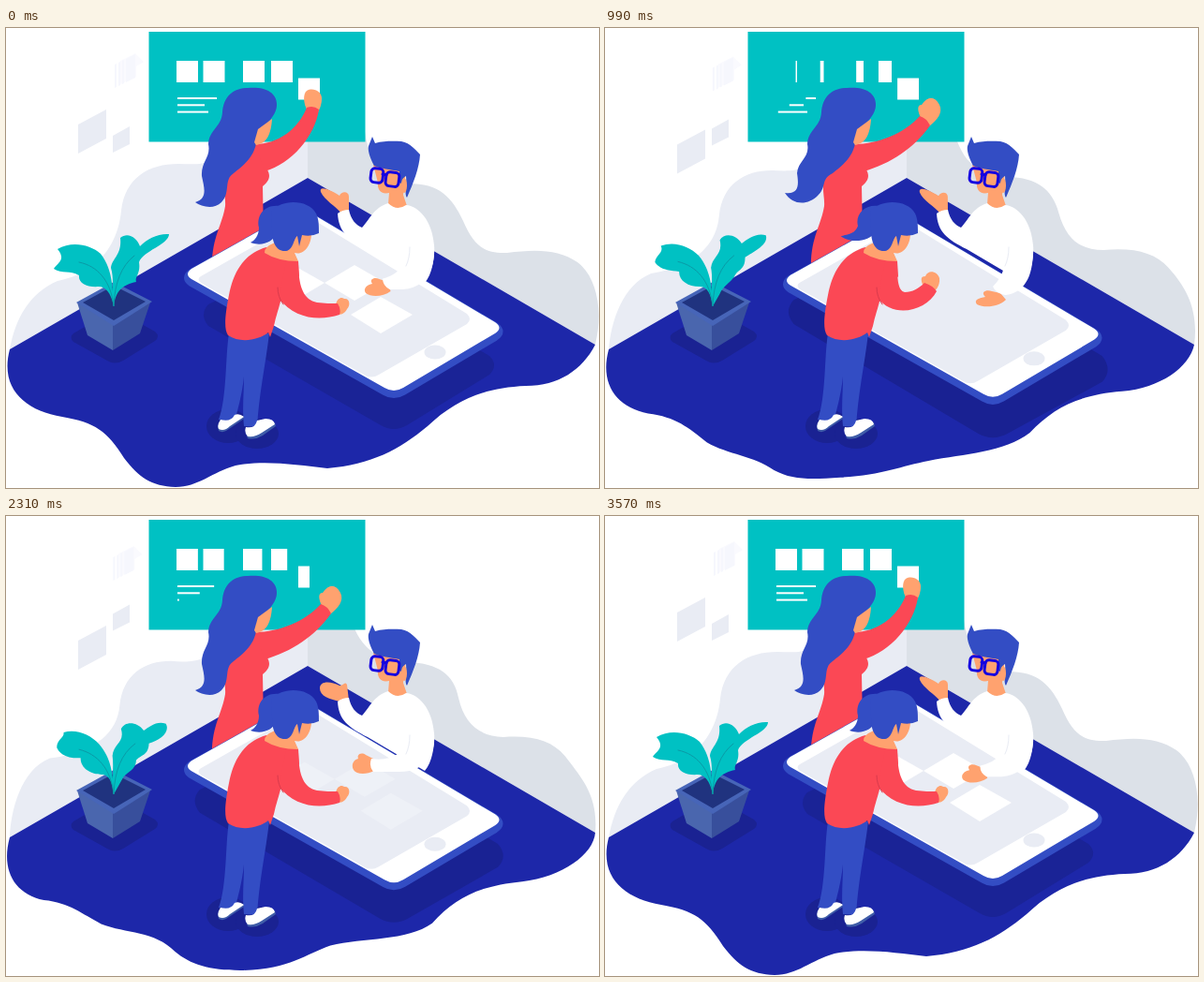
Write an HTML page that moves like this. It is 633 px wide and 491 px high and loops after 3600 ms.

```html
<!DOCTYPE html>
<html lang="en">
<head>
<meta charset="utf-8">
<title>Team at work</title>
<style>
  html, body { margin: 0; width: 100%; height: 100%; overflow: hidden; background: #fff; }
  svg { display: block; width: 633px; height: 491px; }
  .floor { fill: #1d27a9; }
  .shade { fill: #1a2292; }
  .wall { fill: #e9ecf4; }
  .wall2 { fill: #dce1e8; }
  .teal { fill: #00c1c3; }
  .blue { fill: #334dc4; }
  .red { fill: #fb4855; }
  .skin { fill: #ffa26f; }
  .white { fill: #fff; }
  .line { fill: none; stroke-linecap: round; }
</style>
</head>
<body>
<!-- data-to is the second pose of a path, data-by the channel that blends it -->
<svg viewBox="0 0 633 491">
  <path class="wall" data-by="sway"
    d="M4 343C10 310 25 283 55 270C95 262 119 235 123 195C127 160 152 145 184 145C205 145 220 150 240 120L322 100L322 160Z"
    data-to="M4 343C4 315 14 268 45 256C85 251 118 238 121 204C124 172 146 157 174 157C196 159 215 158 232 134L322 100L322 160Z"/>
  <path class="wall2" data-by="sway"
    d="M322 100L382 100C384 130 395 165 430 166C462 166 476 180 488 206C500 234 512 241 535 240C565 236 590 236 610 250C630 265 638 300 629 338L322 160Z"
    data-to="M322 100L362 100C370 130 385 153 430 154C460 155 479 166 482 192C487 220 505 234 530 235C565 233 585 242 597 262C612 284 631 300 629 338L322 160Z"/>
  <path class="floor" data-by="sway"
    d="M322 160L629 338C615 365 590 382 555 382C510 384 480 397 450 425C420 450 390 466 343 470C310 466 275 461 245 467C220 474 205 490 181 490C155 489 142 480 126 459C108 430 95 421 60 415C20 408 -7 385 4 343Z"
    data-to="M322 160L629 338C630 360 595 386 550 392C505 397 480 409 456 437C430 455 380 446 347 456C322 468 310 489 256 489C218 488 196 477 180 459C160 432 125 438 96 430C75 424 62 411 36 409C5 402 -5 375 4 343Z"/>

  <path id="panelA" class="wall" d="M77 103L107 87V118L77 134Z"/>
  <path id="panelB" class="wall" d="M114 115L132 105V124L114 133Z"/>
  <g id="panelC" fill="#f6f7fd">
    <path d="M122 35L138 27L147 36L139 41V52L122 60Z" opacity=".6"/>
    <path d="M116 39l2-1v25l-2 1zM120 37l2-1v25l-2 1zM124 35l2-1v25l-2 1zM128 33l10-5v25l-10 5z"/>
  </g>

  <path class="teal" d="M152.500 4H383.500V121.500H152.500Z"/>
  <g id="notes" class="white"></g>

  <path class="shade" d="M72 326L108 305Q116 300 125 305L159 324Q165 329 159 334L125 355Q116 360 108 355L72 335Q67 330 72 326Z"/>
  <path id="shadow" class="shade" data-by="pulse"
    d="M216 295L330 240L516 350Q526 360 516 370L428 424Q414 432 400 424L216 318Q206 306 216 295Z"
    data-to="M201 290L330 230L531 350Q543 365 531 378L430 433Q414 442 398 433L201 316Q190 302 201 290Z"/>
  <ellipse class="shade" cx="237" cy="425" rx="23" ry="18"/>
  <ellipse class="shade" cx="268" cy="433" rx="23" ry="16"/>

  <!-- plant -->
  <path fill="#4a66ae" d="M76 293L114 310V344L87 328Z"/>
  <path fill="#384f9c" d="M154 293L114 310V344L143 326Z"/>
  <path fill="#4765b8" d="M75 293L115 271L156 292L115 318Z"/>
  <path fill="#20337f" d="M82 293L115 275L149 292L115 312Z"/>
  <path class="teal" data-by="sway"
    d="M115 297C112 282 106 276 99 276C86 277 77 272 78 264C68 258 60 263 51 257C54 251 65 248 55 236C70 227 90 231 101 241C112 255 114 272 115 297Z"
    data-to="M115 297C114 284 111 277 104 276C92 276 80 269 80 257C69 259 58 255 55 245C54 236 62 234 63 230C76 227 90 234 99 244C110 256 115 273 115 297Z"/>
  <path class="teal" data-by="sway"
    d="M115 297C112 280 116 270 112 256C113 246 124 242 122 224C130 217 140 224 143 233C150 225 163 219 174 220C174 231 146 238 142 250C144 262 137 266 139 271C125 274 117 280 115 297Z"
    data-to="M115 297C113 280 115 266 114 256C115 242 128 242 123 228C126 219 140 218 148 228C154 225 160 218 170 222C176 231 168 240 155 241C154 254 146 252 139 258C142 270 132 272 128 274C120 277 116 283 115 297Z"/>
  <path class="line" stroke="#0a9aa6" data-by="sway"
    d="M78 250C98 254 112 270 115 297C116 272 123 254 137 243"
    data-to="M78 249C98 254 112 270 115 297C116 272 123 254 138 243"/>

  <!-- woman at the board -->
  <path class="red" d="M262 125L278 124V150C284 158 280 164 274 169L275 225L220 256C219 225 231 210 234 190C235 178 228 165 240 148Z"/>
  <path class="skin" data-by="reach"
    d="M322 89C317 80 317 70 321 67C328 63 337 68 337 75C337 82 335 86 332 92Z"
    data-to="M338 98C333 88 333 82 338 82C345 72 352 73 357 82C361 90 355 98 346 105Z"/>
  <path class="red" data-by="reach"
    d="M266 124C290 124 312 108 321 85Q328 82 334 87C330 115 305 145 276 153Z"
    data-to="M266 124C292 124 320 112 336 94Q343 96 347 104C330 128 305 145 276 153Z"/>
  <path class="blue" data-by="hair"
    d="M258 64C275 62 290 68 289 83C288 98 270 105 267 123C264 140 251 148 243 155C232 162 240 176 230 186C222 194 209 191 202 186C215 182 212 172 209 158C208 142 219 138 216 124C217 108 230 106 231 90C232 74 242 64 258 64Z"
    data-to="M258 64C275 62 290 68 289 83C288 98 270 105 267 123C264 140 251 148 243 155C230 161 237 170 227 179C217 189 201 190 192 176C207 178 207 168 205 155C206 142 219 138 216 124C217 108 230 106 231 90C232 74 242 64 258 64Z"/>
  <path class="skin" d="M284 97C283 112 279 123 267 125L265 122L269 108Z"/>

  <g id="phone">
    <path id="body" fill="#334dc4" stroke="#334dc4" stroke-width="8" transform="translate(0 4)"
      d="M198 257L305 197Q316 191 328 199L522 314Q531 320 522 326L424 384Q414 390 404 384L198 268Q190 263 198 257Z"/>
    <path id="face" class="white"/>
    <path class="wall" d="M208 265L312 206Q322 201 332 207L492 305Q498 311 492 316L398 370Q390 375 382 370L208 272Q203 268 208 265Z"/>
    <ellipse class="wall" cx="458" cy="346" rx="11.5" ry="7.5"/>
    <path id="cards" class="white" d="M308 254L340 272L308 291L276 272ZM372 253L405 272L372 291L340 272ZM400 287L434 306L400 326L368 306Z"/>
  </g>

  <!-- man -->
  <path class="skin" data-by="palm"
    d="M358 198C352 190 340 184 336 175C334 168 345 172 356 179C358 174 366 174 366 180L366 197Z"
    data-to="M358 198C345 196 335 192 335 184C335 176 346 176 356 181C360 182 361 176 364 180L366 197Z"/>
  <path class="skin" d="M392 146L428 145L424 178L428 190Q418 196 408 188L409 176C400 178 396 172 397 165Z"/>
  <path class="blue" d="M393 147C388 138 386 130 387 126L391 116L394 123C405 120 415 121 422 121C432 123 437 130 442 135C441 150 435 165 428 181C425 178 428 165 427 158C421 161 424 168 420 165L420 153C410 151 400 150 393 147Z"/>
  <ellipse class="skin" cx="425" cy="168" rx="3" ry="8"/>
  <g class="line" stroke="#1400e0" stroke-width="3">
    <rect x="389.500" y="150" width="13" height="15" rx="4" transform="rotate(7 396 157)"/>
    <rect x="405.500" y="154" width="14" height="15" rx="4" transform="rotate(7 412 161)"/>
    <path d="M402 156L406 157"/>
  </g>
  <path class="white" d="M408 187C392 192 388 205 380 213C373 210 368 204 366 194Q359 194 354 198C355 218 366 226 386 236L447 272C456 262 458 240 457 232C455 205 440 190 427 189Q417 196 408 187Z"/>
  <path class="skin" data-by="swipe"
    d="M393 272C385 276 374 276 371 271C368 266 371 260 376 259C374 254 380 252 384 255L392 259Z"
    data-to="M428 290C420 298 405 299 397 295C393 290 400 288 406 287C400 281 408 279 413 281L422 283Z"/>
  <path class="white" data-by="swipe"
    d="M457 236C458 262 440 273 420 273L392 273Q387 267 390 259C408 262 426 255 428 236Z"
    data-to="M457 236C457 262 450 282 428 285L427 285Q417 283 414 276C424 266 428 255 428 236Z"/>
  <path class="line" stroke="#e9ecf4" d="M431 234Q431 246 427 254"/>

  <!-- girl in front -->
  <path class="blue" d="M238 326L281 326C277 360 270 390 268 426L254 425C252 405 254 390 254 372C252 392 247 408 244 421L227 418C236 395 234 350 238 326Z"/>
  <path fill="#3f5ca8" d="M226 424L227 430Q232 433 238 428L254 417L253 414ZM256 432L258 438Q266 440 274 435L288 425L287 421Z"/>
  <path class="white" d="M229 418Q225 424 227 428Q233 431 239 425L254 415Q249 411 244 413Q240 421 229 418ZM256 426Q254 432 258 436Q266 437 273 432L287 423Q286 417 277 417L268 419Q266 428 256 426Z"/>
  <path class="skin" data-by="lift"
    d="M352 295C354 288 358 287 361 289C367 288 368 296 364 300C361 306 355 307 352 305Z"
    data-to="M339 274C337 268 337 265 342 265C345 257 355 260 357 267C358 276 352 281 349 283Z"/>
  <path class="red" d="M278 234C256 240 243 258 238 285C233 310 233 322 237 328C250 337 270 333 280 325L282 330L286 318C288 308 291 300 293 292L313 265L312 249Z"/>
  <path class="red" data-by="lift"
    d="M300 245L312 249C312 275 317 290 332 293C340 294 347 294 354 294Q358 300 356 306C335 313 308 311 291 288Z"
    data-to="M300 245L312 249C312 266 312 280 320 282C328 282 335 278 341 272Q350 275 354 281C343 302 308 311 291 288Z"/>
  <path class="line" stroke="#d93a4c" d="M290 277Q290 287 296 295"/>
  <path class="skin" d="M287 229Q275 234 276 240Q290 249 312 249L308 240C318 243 326 232 326 219L300 212Z"/>
  <path class="blue" data-by="tail"
    d="M292 190C276 188 267 200 270 213C270 222 265 227 261 229C272 233 285 230 290 217Z"
    data-to="M292 190C276 188 267 200 270 211C266 220 258 219 250 221C260 229 280 229 290 217Z"/>
  <path class="blue" d="M283 196C293 183 322 182 331 198C334 204 334 211 334 219Q326 223 316 221L313 233L311 222C307 224 307 237 299 238C288 239 284 228 284 216Z"/>
</svg>
<script>
const LOOP = 3600;
const $ = id => document.getElementById(id);
const clamp = x => Math.min(1, Math.max(0, x));
const wave = x => (1 - Math.cos(2 * Math.PI * x)) / 2;
const ease = (t, a, b) => wave(clamp((t - a) / (b - a)) / 2);
const easeOut = (t, start) => 1 - (1 - clamp((t - start) / 600)) ** 3;

// Rises from a to b, holds, falls from c to d; may run past the loop's end.
function hold(t, a, b, c, d) {
  t = (t - a + LOOP) % LOOP + a;
  return ease(t, a, b) - ease(t, c, d);
}

const numbers = s => s.match(/-?[\d.]+/g).map(Number);
const morphs = [...document.querySelectorAll('[data-to]')].map(el => {
  const from = el.getAttribute('d');
  return { el, from, a: numbers(from), b: numbers(el.dataset.to), by: el.dataset.by };
});

// Notes on the board wipe out to the right and come back from the left.
const notes = [];
function addNote(x, y, w, h, hide, show) {
  const el = document.createElementNS('http://www.w3.org/2000/svg', 'rect');
  el.setAttribute('y', y);
  el.setAttribute('height', h);
  $('notes').append(el);
  notes.push({ el, x, w, hide, show });
}
[182, 210.5, 253, 283, 312].forEach((x, i) =>
  addNote(x, i < 4 ? 35 : 53.5, 23, 23, 630 + 90 * i, 1820 + 90 * i));
[[42, 1956], [29, 2050], [33, 2300]].forEach(([w, show], i) =>
  addNote(183, 74 + 7.3 * i, w, 2, 770 + 105 * i, show));

$('face').setAttribute('d', $('body').getAttribute('d'));

function draw(now) {
  const t = now % LOOP;
  const pose = {
    sway: wave(t / LOOP),
    pulse: wave(2 * t / LOOP),
    reach: hold(t, 640, 960, 2620, 2960),
    hair: hold(t, 650, 980, 1400, 2150),
    tail: hold(t, 150, 600, 750, 1700),
    lift: hold(t, 60, 560, 1560, 2200),
    palm: hold(t, 900, 1450, 2400, 2850),
    swipe: hold(t, 3250, 3950, 5250, 5800)
  };
  for (const { el, from, a, b, by } of morphs) {
    let i = 0;
    el.setAttribute('d', from.replace(/-?[\d.]+/g, () => {
      const v = a[i] + (b[i] - a[i]) * pose[by];
      i++;
      return v.toFixed(2);
    }));
  }
  for (const { el, x, w, hide, show } of notes) {
    const back = t >= show;
    const part = easeOut(t, back ? show : hide);
    el.setAttribute('x', back ? x : x + w * part);
    el.setAttribute('width', w * (back ? part : 1 - part));
  }
  const move = (id, x, y) => $(id).setAttribute('transform', `translate(${x} ${y})`);
  move('panelA', 0, 37 * pose.sway);
  move('panelB', 0, -13 * pose.sway);
  move('panelC', -2 * pose.sway, 6 * pose.sway);
  move('phone', 0, 7 * pose.pulse);
  $('shadow').setAttribute('opacity', 0.8 + 0.2 * pose.pulse);
  const shown = hold(t, 2150, 2650, 3650, 4000);
  move('cards', 14 * (1 - shown), 6 * (1 - shown));
  $('cards').setAttribute('opacity', shown);
  requestAnimationFrame(draw);
}
requestAnimationFrame(draw);
</script>
</body>
</html>
```
